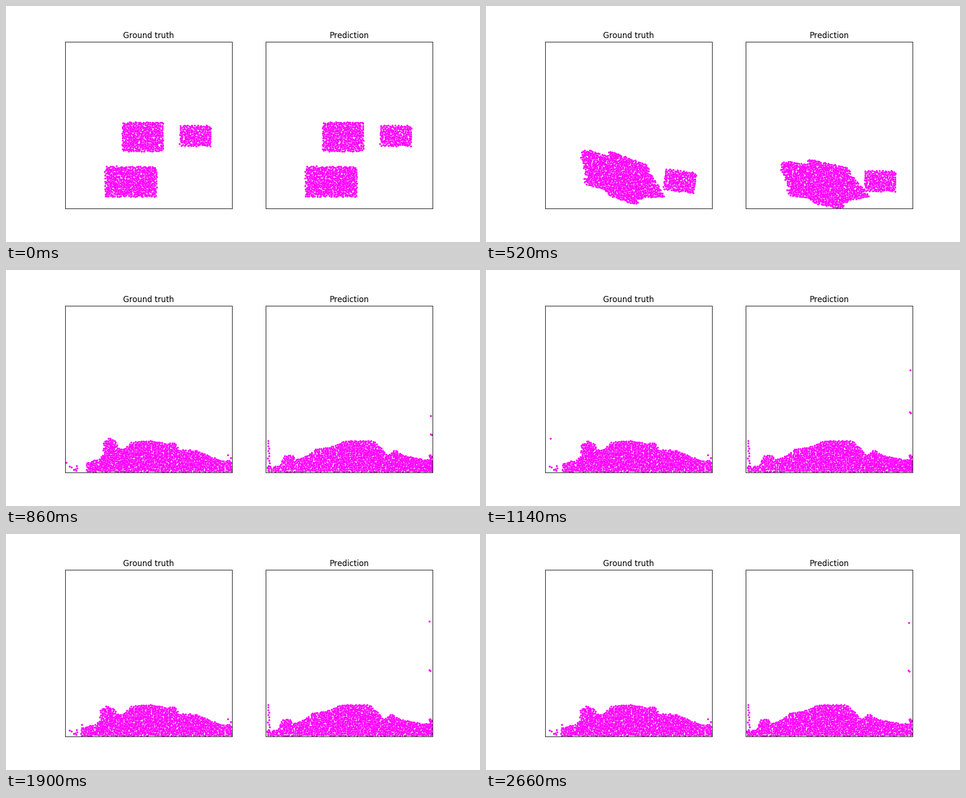
Write a matplotlib script that moves like this. It is 1000x500 px and loops after 2.68 s.

```python
import numpy as np
import matplotlib.pyplot as plt
from matplotlib.animation import FuncAnimation

FRAMES, INTERVAL = 134, 20
LEFT, RIGHT, TOP, FLOOR = 125, 477.27, 76.36, 428.64
GRAVITY, SPACING = 0.2225, 3.6
KEY_TIMES = np.array([0, 5, 14, 26, 40])  # start, touch, clash, fall, landed
LANDED = KEY_TIMES[-1]
CENTRE = 285 + 330j
rng = np.random.default_rng(4)


# Positions are complex numbers x + iy in pixels, y pointing down.
def line(*xy):
    return np.array(xy[::2]) + 1j * np.array(xy[1::2])


def walls(z):
    return np.clip(z.real, 126.5, 475.5) + 1j * np.minimum(z.imag, 427.5)


def scatter(count, x0, y0, x1, y1):
    return rng.uniform(x0, x1, count) + 1j * np.linspace(y0, y1, count)


def relax(z, bounds=walls, radius=3.5, rounds=8):
    """Push grains apart that lie closer than the radius."""
    for _ in range(rounds):
        gap = z[:, None] - z[None, :]
        dist = np.abs(gap) + 1e-6
        push = np.where(dist < radius, gap / dist * (radius - dist), 0)
        z = bounds(z + 0.4 * push.sum(axis=1))
    return z


def block(x0, y0, x1, y1):
    cols, rows = round((x1 - x0) / SPACING), round((y1 - y0) / SPACING)
    i, j = np.meshgrid(np.arange(cols), np.arange(rows))
    u, v = rng.uniform(0, 1, (2, i.size))
    z = x0 + (i.ravel() + u) * (x1 - x0) / cols + 1j * (y0 + (j.ravel() + v) * (y1 - y0) / rows)

    def inside(p):
        return np.clip(p.real, x0, x1) + 1j * np.clip(p.imag, y0, y1)

    z = relax(z, inside, rounds=25)
    return z + 0.4 * (rng.normal(size=z.size) + 1j * rng.normal(size=z.size))


def fly(z, velocity, t):
    return z + velocity * t + 0.5j * GRAVITY * t * t


def turn(z, angle, centre):
    return centre + (z - centre) * np.exp(1j * angle)


def fill(z, top, bottom):
    """Spread the grains evenly between two edges, keeping their order across and down."""
    x0, x1 = top[0].real, top[-1].real
    x = np.linspace(x0, x1, 400)
    roof, base = (np.interp(x, edge.real, edge.imag) for edge in (top, bottom))
    share = np.cumsum(base - roof)
    bounds = np.linspace(x0, x1, round((x1 - x0) / SPACING) + 1)
    splits = np.round(z.size * np.interp(bounds, x, (share - share[0]) / (share[-1] - share[0])))
    across = np.argsort(z.real)
    out = np.empty_like(z)
    for k, (a, b) in enumerate(zip(splits[:-1].astype(int), splits[1:].astype(int))):
        ids = across[a:b]
        ids = ids[np.argsort(z[ids].imag)]
        v = (np.arange(b - a) + rng.uniform(0.2, 0.8, b - a)) / max(b - a, 1)
        px = rng.uniform(bounds[k], bounds[k + 1], b - a)
        y0, y1 = np.interp(px, x, roof), np.interp(px, x, base)
        out[ids] = px + 1j * (y0 + (y1 - y0) * v)
    return relax(out)


def tossed(frame):
    t = np.clip(frame - 43, -3, 46)
    return [126 + 0.73 * max(t, 0) + 1j * (408 - 5.2 * t + 0.5 * GRAVITY * t * t)]


def climbers(frame):
    t = frame - LANDED
    x = 474.5 - 5.5 * np.sqrt(t / (FRAMES - LANDED))
    left = max(0, 1 - t / 30) ** 2
    low = x - 0.5 + 1j * (287 + 75 * left + 0.02 * t)
    return [low, low + 2 + 1j * (1 + 0.01 * t), x + 1j * (182 + 156 * left + 0.06 * t)]


def flap_upright(z):
    """The left flap stands narrower and taller before it slumps."""
    near = np.maximum(255 - z.real, 0)
    stretch = 1 + 0.16 * np.minimum(near / 30, 1)
    return z.real + 0.14 * near + 1j * (FLOOR - (FLOOR - z.imag) * stretch)


def before_drift(z):
    return z + 15 * np.sqrt(np.sin(np.pi * (z.real - LEFT) / (RIGHT - LEFT)))


lower, upper, small = block(209, 340, 317, 404), block(245.5, 246, 331, 308), block(367, 253, 432, 297)
touch = np.concatenate([fly(lower, 0.3 - 5j, 5), fly(upper, 0.2 + 0.9j, 5)])
clash = fill(touch,
             line(191, 285, 212, 282, 243, 287, 250, 275, 290, 283, 333, 290, 338, 304, 379, 348),
             line(191, 302, 201, 315, 211, 355, 250, 358, 268, 370, 322, 378, 335, 360, 379, 351))


class Panel:
    def __init__(self, tilts, shifts, small_tilt, profile, unsettle, rest_time, strays, flight):
        self.rest_time, self.flight = rest_time, flight
        drop = [fly(small, 0.35 + 0.8j, t) for t in KEY_TIMES[:4]]
        drop[3] = turn(drop[3], small_tilt, drop[3].mean())
        merged = [np.concatenate([lower, upper]), touch]
        merged += [turn(clash, tilt, CENTRE) + shift for tilt, shift in zip(tilts, shifts)]
        keys = [np.concatenate(pair) for pair in zip(merged, drop)]

        left, right = strays
        across = np.argsort(keys[3].real)
        heap = across[left.size:across.size - right.size]
        rest = np.empty_like(keys[3])
        rest[across[:left.size]] = left
        rest[across[across.size - right.size:]] = right
        rest[heap] = fill(keys[3][heap], profile, profile.real + 427.5j)
        landed = rest.copy()
        landed[heap] = walls(unsettle(rest[heap]))
        count = len(flight(LANDED))
        self.fliers = across[:1] if count == 1 else across[-count:]
        landed[self.fliers] = flight(LANDED)

        self.keys = np.array(keys + [landed, rest])
        self.speed = np.gradient(self.keys[:5], KEY_TIMES, axis=0)
        self.speed[-1] = 0

    def pose(self, frame):
        if frame < LANDED:
            k = np.searchsorted(KEY_TIMES, frame, side="right") - 1
            span = KEY_TIMES[k + 1] - KEY_TIMES[k]
            s = (frame - KEY_TIMES[k]) / span
            a, b = self.keys[k:k + 2]
            va, vb = self.speed[k:k + 2] * span
            z = a + (b - a) * s * s * (3 - 2 * s) + va * s * (1 - s) ** 2 - vb * s * s * (1 - s)
        else:
            s = min(1, (frame - LANDED) / (self.rest_time - LANDED))
            z = self.keys[4] * (1 - s) + self.keys[5] * s
            z[self.fliers] = self.flight(frame)
        return walls(z)


truth = Panel(
    (0, 0.185), (0, 2 + 37j), 0.125,
    line(158, 410, 195, 402, 200, 372, 212, 364, 224, 368, 238, 383, 252, 378, 264, 364,
         306, 361, 340, 368, 356, 364, 364, 381, 402, 382, 455, 404, 476, 404),
    flap_upright, 62, (scatter(8, 127, 413, 152, 425), scatter(3, 465, 392, 476, 404)), tossed)
prediction = Panel(
    (-0.05, 0.04), (3 + 2j, 7 + 50j), 0,
    line(127, 415, 148, 415, 157, 392, 170, 391, 181, 401, 203, 392, 219, 379, 252, 374,
         279, 361, 339, 362, 369, 392, 386, 381, 404, 392, 452, 401, 476, 402),
    before_drift, FRAMES - 1, (scatter(13, 129, 362, 134, 425), scatter(10, 467, 392, 476, 405)), climbers)

plt.rcParams["text.kerning_factor"] = 6
fig, axes = plt.subplots(1, 2, figsize=(10, 5), dpi=100)
grains = []
for ax, title in zip(axes, ("Ground truth", "Prediction")):
    ax.set(title=title, xlim=(LEFT, RIGHT), ylim=(FLOOR, TOP), xticks=[], yticks=[], aspect="equal")
    grains += ax.plot([], [], "o", ms=2, color="magenta")


def update(frame):
    for dots, panel in zip(grains, (truth, prediction)):
        z = panel.pose(frame)
        dots.set_data(z.real, z.imag)
    return grains


anim = FuncAnimation(fig, update, frames=FRAMES, interval=INTERVAL, repeat=True, repeat_delay=0)
plt.show()
```
